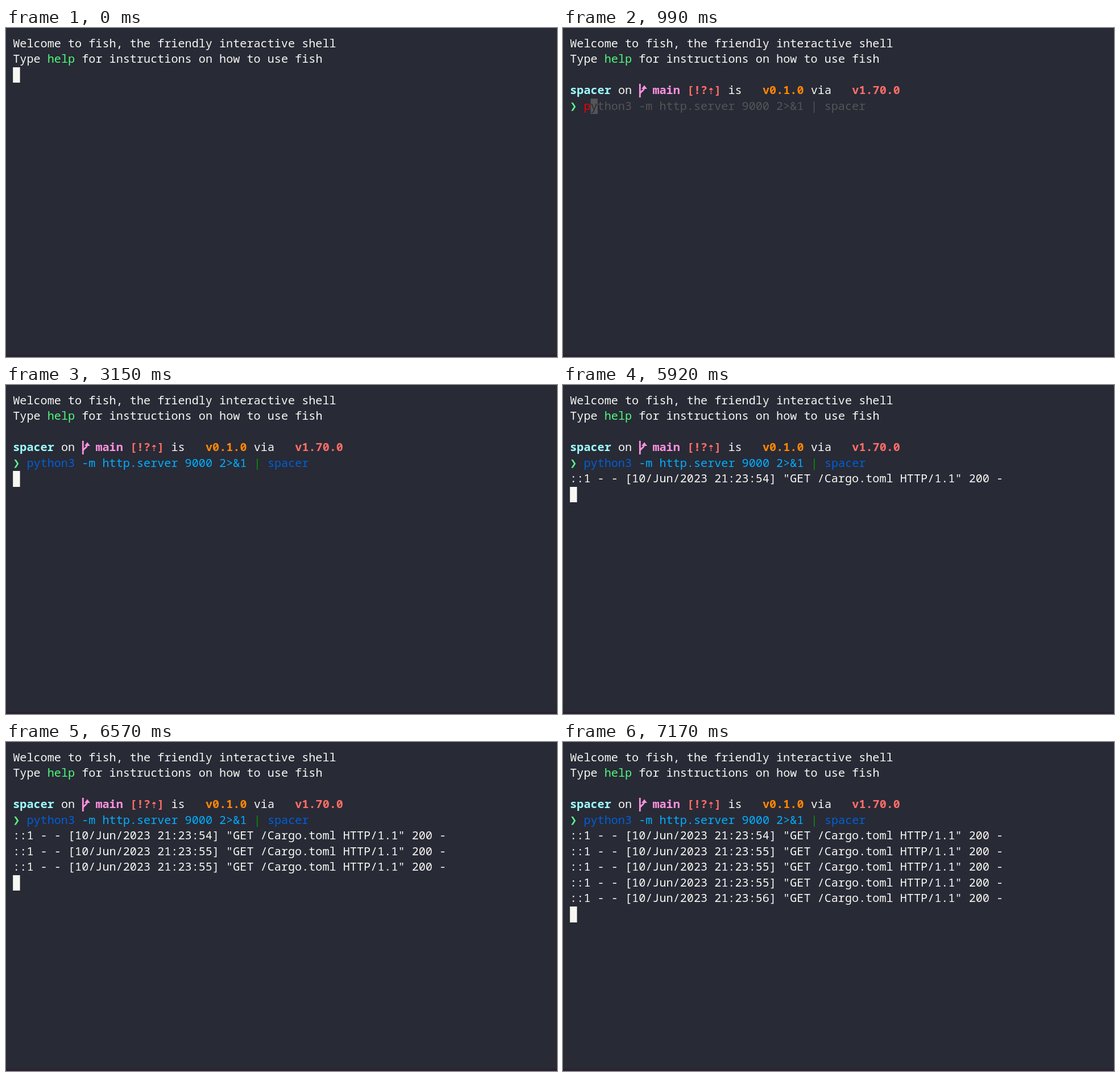
An HTML page with a canvas that plays this animation: 969x578 px, repeating every 8000 ms.

```html
<!DOCTYPE html>
<html lang="en">
<head>
<meta charset="utf-8">
<title>Terminal session</title>
<style>
  html, body { margin: 0; width: 100%; height: 100%; overflow: hidden; background: #282a36; }
  canvas { display: block; }
</style>
</head>
<body>
<canvas id="screen" width="969" height="578"></canvas>
<script>
const ctx = document.getElementById('screen').getContext('2d');
const LOOP = 8000, CELL = 12.1, LINE = 27.55, LEFT = 12.2, TOP = 13.5;
const BG = '#282a36', FG = '#f8f8f2', PINK = '#ff92df', RED = '#ff6e67', GHOST = '#555555';
const COMMAND = 'python3 -m http.server 9000 2>&1 | spacer';
const PROMPT_AT = 270, TYPED_AT = [990, 1290], ACCEPT_AT = 1780, RUN_AT = 3150;
const LOGS = [[5920, 54], [6240, 55], [6570, 55], [6870, 55], [7170, 56]];

const colX = col => LEFT + col * CELL;
const rowY = row => Math.round(TOP + row * LINE);

function print(row, col, text, color = FG, weight = 400) {
  ctx.font = `${weight} 20.167px "Noto Sans Mono", "DejaVu Sans Mono", monospace`;
  ctx.fillStyle = color;
  ctx.fillText(text, colX(col), rowY(row) + 20);
}

function cursor(row, col, color = FG) {
  ctx.fillStyle = color;
  ctx.fillRect(colX(col), rowY(row), 12.4, rowY(row + 1) - rowY(row));
}

function branchIcon() {
  ctx.strokeStyle = ctx.fillStyle = PINK;
  ctx.lineWidth = 2.8;
  ctx.stroke(new Path2D('M135.3 98V122M135.3 117C135.3 110 143 112 143 104'));
  ctx.fill(new Path2D('M138 107L143 100.5L148 107Z'));
}

function prompt() {
  print(3, 0, 'spacer', '#9effff', 700);
  print(3, 7, 'on');
  branchIcon();
  print(3, 12, 'main', PINK, 700);
  print(3, 17, '[!?', RED, 700);
  print(3, 20, '⇡', RED, 700);
  print(3, 21, ']', RED, 700);
  print(3, 23, 'is');
  print(3, 28, 'v0.1.0', '#ff8700', 700);
  print(3, 35, 'via');
  print(3, 41, 'v1.70.0', RED, 700);
  print(4, 0, '❯', '#5af78e', 700);
}

// Partly typed command with the rest shown as a suggestion
function typing(count) {
  if (!count) return cursor(4, 2);
  print(4, 2, COMMAND.slice(0, count), '#f00000');
  print(4, 2 + count, COMMAND.slice(count), GHOST);
  cursor(4, 2 + count, GHOST);
  print(4, 2 + count, COMMAND[count], BG);
}

function acceptedCommand() {
  print(4, 2, 'python3', '#005fd7');
  print(4, 10, '-m http.server 9000 2>&1', '#00afff');
  print(4, 35, '|', '#009900');
  print(4, 37, 'spacer', '#005fd7');
}

function draw(t) {
  ctx.fillStyle = BG;
  ctx.fillRect(0, 0, 969, 578);
  ctx.fillStyle = '#2b2233';
  ctx.fillRect(0, 574, 969, 4);

  print(0, 0, 'Welcome to fish, the friendly interactive shell');
  print(1, 0, 'Type');
  print(1, 5, 'help', '#50fa7b');
  print(1, 10, 'for instructions on how to use fish');

  if (t < PROMPT_AT) return cursor(2, 0);
  prompt();
  if (t < ACCEPT_AT) return typing(TYPED_AT.filter(at => t >= at).length);
  acceptedCommand();
  if (t < RUN_AT) return cursor(4, 2 + COMMAND.length);

  const shown = LOGS.filter(([at]) => t >= at);
  shown.forEach(([, second], i) =>
    print(5 + i, 0, `::1 - - [10/Jun/2023 21:23:${second}] "GET /Cargo.toml HTTP/1.1" 200 -`));
  cursor(5 + shown.length, 0);
}

function tick() {
  draw(performance.now() % LOOP);
  requestAnimationFrame(tick);
}
tick();
</script>
</body>
</html>
```
